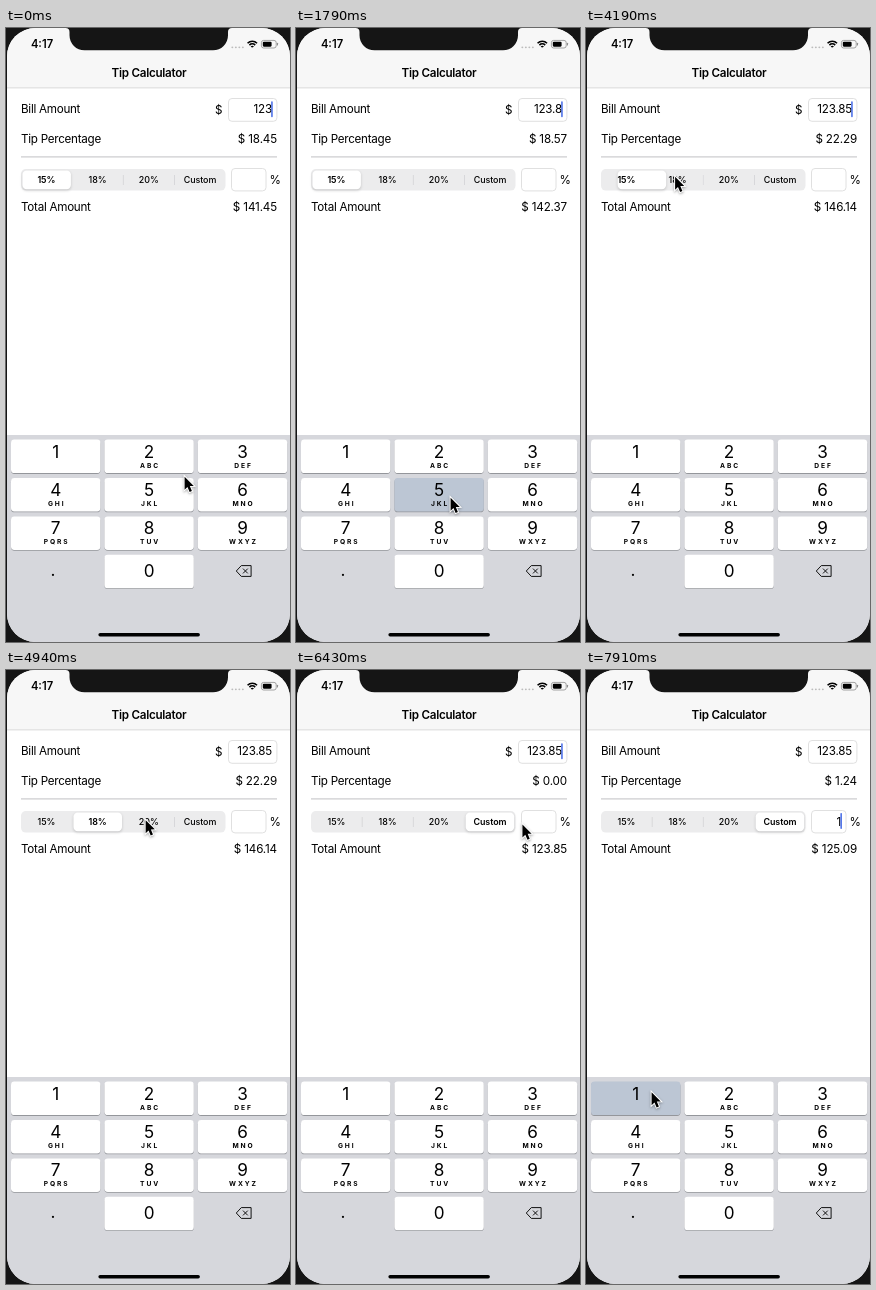
Animation of 284x614 px, one loop 8000 ms. Source, as an HTML page with a canvas:

```html
<!DOCTYPE html>
<html lang="en">
<head>
<meta charset="utf-8">
<title>Tip Calculator</title>
<style>
html, body { margin: 0; width: 100%; height: 100%; overflow: hidden; background: #151515; }
canvas { display: block; width: 284px; height: 614px; }
</style>
</head>
<body>
<canvas id="stage"></canvas>
<script>
const W = 284, H = 614, LOOP = 8000, STEP = 149.25;
const BLACK = '#151515', EDGE = '#d9d9d9';
const canvas = document.getElementById('stage');
const ctx = canvas.getContext('2d');
const dpr = window.devicePixelRatio || 1;
canvas.width = W * dpr;
canvas.height = H * dpr;

// Pointer moves: start time, end time, destination
const HOME = [178, 447.5];
const MOVES = [
  [0, 560, 36, 558], [720, 1150, 125, 502], [1450, 1785, 154, 468.5],
  [2400, 2980, 26, 160], [2980, 3130, 71.5, 146.5], [3140, 3440, 88.5, 147.5],
  [4640, 4950, 140, 149], [5240, 5520, 205, 154], [6130, 6560, 233, 153],
  [7020, 7640, 65, 440], [7640, 7900, 65, 421]
];
const KEYS = [[590, '.'], [1490, '8'], [1935, '5'], [7900, '1']];
const PICKS = [4140, 5040, 5930];
const FOCUS = 6560;
const TABS = ['15%', '18%', '20%', 'Custom'];
const LETTERS = ['', 'ABC', 'DEF', 'GHI', 'JKL', 'MNO', 'PQRS', 'TUV', 'WXYZ'];

const clamp = v => Math.max(0, Math.min(1, v));
const easeOut = u => 1 - Math.pow(1 - clamp(u), 3);
const smooth = u => clamp(u) ** 2 * (3 - 2 * clamp(u));
const typed = (from, to) => KEYS.filter(([k]) => k >= from && k <= to).map(k => k[1]).join('');

function pointerAt(t) {
  return MOVES.reduce(([x, y], [a, b, toX, toY]) => {
    const u = smooth((t - a) / (b - a));
    return [x + (toX - x) * u, y + (toY - y) * u];
  }, HOME);
}

function text(str, x, y, { size = 11.66, weight = 400, align = 'left', gap = -0.28 } = {}) {
  ctx.font = `${weight} ${size}px Inter, "Liberation Sans", sans-serif`;
  ctx.letterSpacing = gap + 'px';
  ctx.textAlign = align;
  ctx.fillStyle = '#000';
  ctx.fillText(str, x, y);
}

function box(x, y, w, h, r, fill, stroke) {
  ctx.beginPath();
  ctx.roundRect(x, y, w, h, r);
  if (fill) { ctx.fillStyle = fill; ctx.fill(); }
  if (stroke) { ctx.strokeStyle = stroke; ctx.lineWidth = 0.8; ctx.stroke(); }
}

function rect(x, y, w, h, fill) {
  ctx.fillStyle = fill;
  ctx.fillRect(x, y, w, h);
}

function poly(points, closed = true) {
  ctx.beginPath();
  points.forEach(([x, y]) => ctx.lineTo(x, y));
  if (closed) ctx.closePath();
}

function shadow(color, blur, dy) {
  ctx.shadowColor = color;
  ctx.shadowBlur = blur * dpr;
  ctx.shadowOffsetY = dy * dpr;
}

function statusBar() {
  rect(0, 0, W, 59.5, '#f7f7f7');
  rect(0, 59.5, W, 0.8, '#cfcfcf');
  text('4:17', 36, 20, { size: 11.2, weight: 600, align: 'center', gap: 0 });
  for (let i = 0; i < 4; i++) box(225.4 + i * 3.5, 18.4, 1.9, 1.9, 1, '#bcbcbc');
  // Wi-Fi
  ctx.strokeStyle = '#000';
  ctx.lineWidth = 1.6;
  for (const r of [6.7, 4.1, 1.5]) {
    ctx.beginPath();
    ctx.arc(246.3, 20, r, -Math.PI * 0.75, -Math.PI * 0.25);
    ctx.stroke();
  }
  // Battery
  box(255.4, 12.4, 14.8, 7.6, 2.2, null, '#8c8c8c');
  box(256.8, 13.7, 8.8, 5, 1.1, '#000');
  box(271, 14.8, 1, 2.8, 0.5, '#8c8c8c');
  text('Tip Calculator', 143, 49, { weight: 600, align: 'center' });
}

function notch() {
  const left = 63.5, right = 222, r = 15;
  ctx.beginPath();
  ctx.moveTo(left - 4, 0);
  ctx.arcTo(left, 0, left, 4, 4);
  ctx.arcTo(left, 22.3, left + r, 22.3, r);
  ctx.arcTo(right, 22.3, right, 4, r);
  ctx.arcTo(right, 0, right + 4, 0, 4);
  ctx.lineTo(right + 4, 0);
  ctx.fillStyle = BLACK;
  ctx.fill();
}

function tabs(t) {
  const pos = PICKS.reduce((sum, p) => sum + easeOut((t - p) / 350), 0);
  box(15, 141, 204.5, 21.6, 4.8, '#ececed');
  for (let i = 0; i < 3; i++) {
    ctx.globalAlpha = clamp(Math.abs(pos - i - 0.5) - 0.5);
    rect(65.8 + i * 51.1, 147, 0.7, 10, '#cfcfd2');
  }
  ctx.globalAlpha = 1;
  ctx.save();
  shadow('rgba(0,0,0,0.18)', 3, 1.2);
  box(16.4 + pos * 51.1, 142.4, 48.5, 18.8, 4.2, '#fff');
  ctx.restore();
  TABS.forEach((label, i) => text(label, 40.4 + i * 51.2, 155, {
    size: 8.92, weight: Math.abs(pos - i) < 0.5 ? 600 : 500, align: 'center', gap: -0.05
  }));
}

function caret(t) {
  const last = Math.max(0, ...[...KEYS.map(k => k[0]), FOCUS].filter(e => e <= t));
  if ((t - last) % 1000 > 530) return;
  const [x, y] = t < FOCUS ? [265.2, 73.2] : [254.4, 143];
  box(x, y, 1.5, 16, 0.7, '#4268e6');
}

function form(t) {
  const bill = '123' + typed(0, Math.min(t, FOCUS)), custom = typed(FOCUS, t);
  const picked = PICKS.filter(p => p + 30 <= t).length;
  const rate = picked < 3 ? parseInt(TABS[picked]) : Number(custom);
  const money = (v, y) => text('$ ' + (Math.round(v * 100 + 1e-6) / 100).toFixed(2), 271, y,
    { align: 'right', gap: -0.15 });
  const right = { align: 'right', gap: -0.2 };
  text('Bill Amount', 15, 85);
  text('Tip Percentage', 15, 115);
  text('Total Amount', 15, 183);
  text('$', 209, 86);
  box(222.5, 70.5, 48.4, 22.8, 3.5, '#fff', EDGE);
  text(bill, 266, 85, right);
  money(bill * rate / 100, 115);
  rect(15, 128.3, 256, 1.2, '#cbcbcd');
  tabs(t);
  box(225.5, 140.5, 34.5, 22.4, 3.5, '#fff', EDGE);
  text('%', 263.4, 156);
  text(custom, 255, 156, right);
  money(bill * (1 + rate / 100), 183);
  caret(t);
}

function key(n, t) {
  const col = n ? (n - 1) % 3 : 1, row = n ? Math.floor((n - 1) / 3) : 3;
  const x = 5 + col * 93.4, y = 411.6 + row * 38.4, mid = x + 44.7;
  const down = KEYS.some(([k, name]) => name === String(n) && t > k - 155 && t < k + 100);
  box(x, y + 0.8, 89.4, 33.5, 3.4, '#94969b');
  box(x, y, 89.4, 33.5, 3.4, down ? '#bcc6d4' : '#fff');
  text(String(n), mid, y + (n ? 18 : 22.3), { size: 17.15, align: 'center', gap: 0 });
  if (n > 1) text(LETTERS[n - 1], mid + 1, y + 28, { size: 6.7, weight: 700, align: 'center', gap: 1.9 });
}

function keypad(t) {
  rect(0, 407, W, H - 407, '#d6d7dc');
  for (let n = 0; n < 10; n++) key(n, t);
  text('.', 47, 547.5, { size: 17.15, align: 'center', gap: 0 });
  // Delete key
  ctx.strokeStyle = '#111';
  ctx.lineWidth = 1;
  ctx.lineJoin = 'round';
  poly([[230.3, 543], [235.3, 537.6], [245.1, 537.6], [245.1, 548.4], [235.3, 548.4]]);
  ctx.stroke();
  for (const s of [-1, 1]) {
    poly([[237, 543 - 2.4 * s], [241.8, 543 + 2.4 * s]], false);
    ctx.stroke();
  }
  box(92.4, 605, 101.5, 3.4, 1.7, '#000');
}

function pointer(t) {
  const [x, y] = pointerAt(t);
  ctx.save();
  ctx.translate(x + 0.6, y + 1.2);
  ctx.scale(0.9, 0.9);
  poly([[0, 0], [0, 14.4], [3.2, 11.4], [5.6, 17], [8.1, 15.9], [5.8, 10.4], [10.2, 10.2]]);
  ctx.save();
  shadow('rgba(0,0,0,0.35)', 2.5, 1);
  ctx.strokeStyle = '#fff';
  ctx.lineWidth = 2.2;
  ctx.stroke();
  ctx.restore();
  ctx.fillStyle = '#000';
  ctx.fill();
  ctx.restore();
}

function draw(t) {
  ctx.setTransform(dpr, 0, 0, dpr, 0, 0);
  rect(0, 0, W, H, BLACK);
  ctx.save();
  ctx.beginPath();
  ctx.roundRect(1, 0, 283, 614, 28.5);
  ctx.clip();
  rect(0, 0, W, H, '#fff');
  statusBar();
  form(t);
  keypad(t);
  notch();
  ctx.restore();
  pointer(t);
}

// The screen refreshes at a fixed, coarse rate
function tick(now) {
  const t = Math.max(0, now - start) % LOOP;
  draw(Math.floor(t / STEP + 0.03) * STEP);
  requestAnimationFrame(tick);
}

const start = performance.now();
draw(0);
requestAnimationFrame(tick);
</script>
</body>
</html>
```
